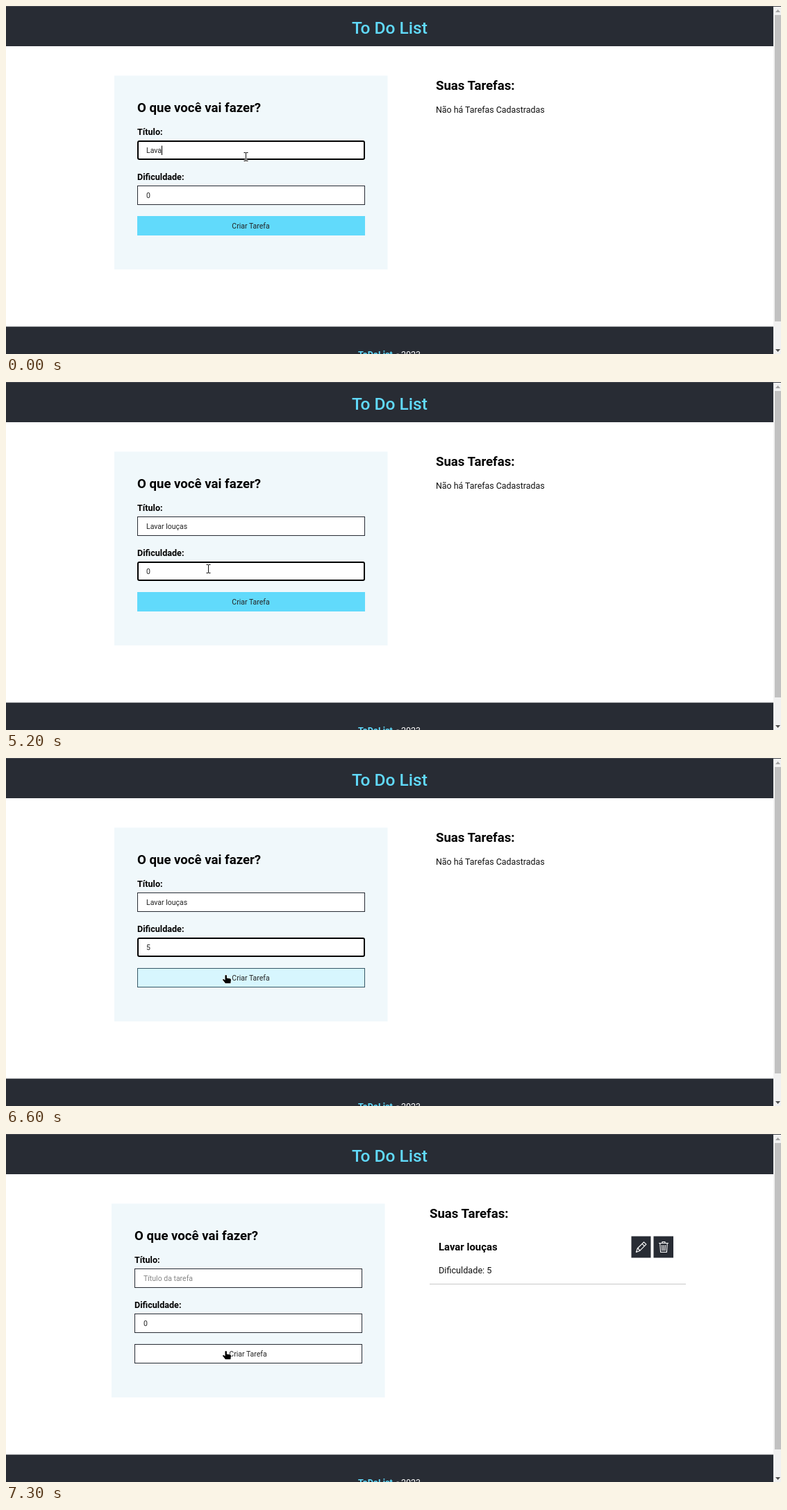
Animation, 1116 px wide and 502 px high, one loop 8000 ms. Source, as an HTML page:

```html
<!DOCTYPE html>
<html lang="pt-BR">
<head>
<meta charset="utf-8">
<title>To Do List</title>
<style>
  html, body { margin: 0; width: 100%; height: 100%; overflow: hidden; background: #fff; }
  svg { display: block; width: 1116px; height: 502px; font: 12.4px Roboto, "Open Sans", sans-serif; }
  .heading { font-size: 18.6px; font-weight: 600; }
  .label { font-size: 12.6px; font-weight: 600; }
  .control { font-size: 10.5px; fill: #222; }
  .field { fill: #fff; stroke: #282c34; }
  .field.focus { stroke: #000; stroke-width: 2; }
  .icon { fill: none; stroke: #fff; stroke-width: 1.1; stroke-linejoin: round; stroke-linecap: round; }
</style>
</head>
<body>
<svg viewBox="0 0 1116 502">
  <!-- page frame -->
  <rect width="1105" height="58" fill="#282c34"/>
  <rect width="1116" height="1" fill="#45484f"/>
  <text x="552.5" y="40" text-anchor="middle" font-size="24.5" font-weight="500" fill="#61dafb">To Do List</text>
  <rect y="462.5" width="1105" height="39.5" fill="#282c34"/>
  <text x="507" y="507" font-size="12.6" font-weight="600" fill="#61dafb">ToDoList</text>
  <text x="561" y="507" font-size="8" fill="#fff">©</text>
  <text x="569" y="507" fill="#fff">2023</text>
  <rect x="1105" y="1" width="11" height="501" fill="#f1f1f1"/>
  <rect x="1107" y="13" width="9" height="442" fill="#c1c1c1"/>
  <path d="M1108 9l3.500-4 3.500 4z" fill="#a3a3a3"/>
  <path d="M1108 495l3.500 4 3.500-4z" fill="#505050"/>

  <g id="form">
    <rect x="156" y="100.500" width="393.500" height="279.500" fill="#f0f8fb"/>
    <text class="heading" x="189" y="153">O que você vai fazer?</text>
    <text class="label" x="189" y="186">Título:</text>
    <rect id="titleBox"/>
    <text class="control" id="title" x="202" y="212"></text>
    <text class="label" x="189" y="251">Dificuldade:</text>
    <rect id="levelBox"/>
    <text class="control" id="level" x="202" y="276.500"></text>
    <rect id="button" x="189.500" y="303.500" width="327" height="27"/>
    <text class="control" x="352.500" y="321" text-anchor="middle">Criar Tarefa</text>
    <rect id="caret" width="1" height="13.500"/>
  </g>

  <text class="heading" id="listHeading" y="120.500">Suas Tarefas:</text>
  <text id="empty" x="619" y="153.500" fill="#111">Não há Tarefas Cadastradas</text>
  <g id="task">
    <text x="623" y="168" font-size="14.9" font-weight="600">Lavar louças</text>
    <text x="623" y="200.500" font-size="12.7" fill="#111">Dificuldade: 5</text>
    <path d="M900.500 147.500h28v31h-28zM932.500 147.500h28.500v31h-28.500z" fill="#282c34"/>
    <path class="icon" d="M907.500 170.500l1.800-5.500 9.200-9.200 3.400 3.400-9.200 9.200zM916 158.300l3.400 3.400M909.300 165l1.500.400.300 1.500 1.500.300.200 1.300"/>
    <path class="icon" d="M940.500 157.500h13M945 157v-1.500h4v1.500M941.800 158l.8 12.500h8.800l.8-12.500M944.600 160.500l.3 7.500M947 160.500v7.500M949.400 160.500l-.3 7.500"/>
    <path d="M610 216.500h369" stroke="#c8c8c8"/>
  </g>

  <g id="beam" fill="none">
    <path d="M-3-6h2.500l.5.500.5-.5h2.500M0-5.500v11M-3 6h2.500l.5-.5.5.5h2.500" stroke="#fff" stroke-width="2.600"/>
    <path d="M-3-6h2.500l.5.500.5-.5h2.500M0-5.500v11M-3 6h2.500l.5-.5.5.5h2.500" stroke="#111"/>
  </g>
  <path id="hand" d="M315.500 313.500q1.200-1.200 2.400 0v4l4.800.800q1.300.400 1.300 1.700l-.7 5h-7.300l-4-5q.3-1.500 1.800-.8l1.700 1.200z"
    fill="#000" stroke="#fff" stroke-width="1.200" paint-order="stroke"/>
</svg>
<script>
const $ = id => document.getElementById(id);
const show = (id, on) => $(id).setAttribute('visibility', on ? 'visible' : 'hidden');
const shift = (id, x, y = 0) => $(id).setAttribute('transform', `translate(${x} ${y})`);
const mix = (a, b, p) => `rgb(${a.map((v, i) => Math.round(v + (b[i] - v) * p))})`;
const CYAN = [97, 218, 251], WHITE = [255, 255, 255], DARK = [40, 44, 52];

// CSS "ease": cubic-bezier(.25, .1, .25, 1)
function ease(x) {
  if (x <= 0 || x >= 1) return x <= 0 ? 0 : 1;
  let lo = 0, hi = 1;
  for (let i = 0; i < 20; i++) {
    const u = (lo + hi) / 2;
    if (.75 * u * (1 - u) + u ** 3 < x) lo = u; else hi = u;
  }
  return .3 * lo * (1 - lo) ** 2 + 3 * lo * lo * (1 - lo) + lo ** 3;
}

function setField(id, y, focus) {
  const inset = focus ? 1 : .5, box = $(id);
  const attrs = { class: focus ? 'field focus' : 'field', x: 189 + inset, y: y + inset,
    width: 328 - 2 * inset, height: 28 - 2 * inset, rx: focus ? 2 : 0 };
  for (const name in attrs) box.setAttribute(name, attrs[name]);
}

function draw(t) {
  const inTitle = t < 4600, created = t >= 7300, hover = t >= 6400;
  shift('form', created ? -4 : 0);
  $('listHeading').setAttribute('x', created ? 610 : 619);
  show('empty', !created);
  show('task', created);

  setField('titleBox', 194, inTitle);
  setField('levelBox', 259, !inTitle && !created);
  $('title').textContent = t < 700 ? 'Lava' : inTitle ? 'Lavar ' : created ? 'Título da tarefa' : 'Lavar louças';
  $('title').style.fill = created ? '#858585' : '';
  $('level').textContent = t >= 5800 && !created ? '5' : '0';

  show('caret', t < 5200 || (t >= 5800 && t < 6300));
  $('caret').setAttribute('x', t < 700 ? 224 : inTitle ? 230 : t < 5800 ? 208 : 207);
  $('caret').setAttribute('y', inTitle ? 201.5 : 266);

  const fade = created ? 1 : ease((Math.min(Math.floor(t / 100) * 100, 6800) - 6375) / 500);
  $('button').setAttribute('fill', mix(CYAN, WHITE, fade));
  $('button').setAttribute('stroke', mix(CYAN, DARK, fade));

  show('beam', !hover);
  show('hand', hover);
  if (inTitle) shift('beam', 345.5, 217.5);
  else if (t < 6300) shift('beam', 291.5, 269.5);
  else shift('beam', 299.5, 284.5);
}

const start = performance.now();
function tick() {
  draw((performance.now() - start) % 8000);
  requestAnimationFrame(tick);
}
tick();
</script>
</body>
</html>
```
